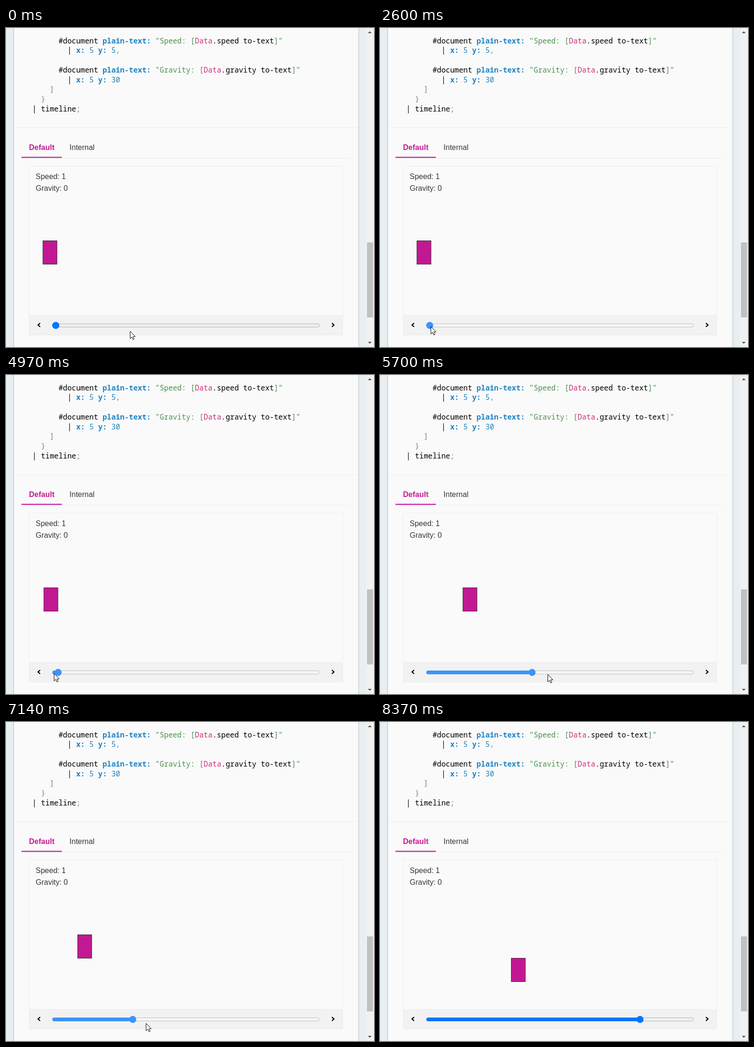
An HTML page that plays this animation: 784x680 px, repeating every 9.2 s.

```html
<!DOCTYPE html>
<html lang="en">
<head>
<meta charset="utf-8">
<title>Timeline scrubbing</title>
<style>
html, body { margin: 0; width: 100%; height: 100%; overflow: hidden; background: #e7eff2; }
svg { display: block; }
text { white-space: pre; font: 16px "Liberation Sans", Arial, sans-serif; fill: #363636; }
#code text { font: 15.625px "Noto Sans Mono", "DejaVu Sans Mono", monospace; fill: #000; }
#code .k { fill: #1f83c4; font-weight: 700; }
#code .n { fill: #1f83c4; }
#code .s { fill: #4b914f; }
#code .d { fill: #d32b79; }
#code .p { fill: #75868c; }
</style>
</head>
<body>
<svg width="784" height="680" viewBox="0 0 784 680">
  <rect x="15" y="-5" width="737.5" height="690" fill="#d3dadd"/>
  <rect x="16" y="-5" width="735" height="690" fill="#c9ced0"/>
  <rect x="17" y="-5" width="733.5" height="690" fill="#fafafa"/>

  <rect x="767" width="17" height="680" fill="#f1f1f1"/>
  <rect x="769" y="457" width="13" height="160" fill="#c1c1c1"/>
  <path d="M771 11l4-4 4 4zM771 669l4 4 4-4z" fill="#505050"/>

  <g id="code"></g>

  <path d="M17 212.5H750M33 277.5H733" stroke="#eeeef0"/>
  <text x="49" y="260" style="font-weight:700;fill:#c21b92">Default</text>
  <text x="135.3" y="260">Internal</text>
  <rect x="33" y="274.5" width="86" height="2.5" fill="#d030a4"/>

  <rect x="50" y="612" width="668" height="43" fill="#f2f2f2"/>
  <path d="M49.5 294.5H717.5V654.5H49.5ZM50 612.5H717" fill="none" stroke="#ededed"/>
  <text x="63.3" y="322">Speed: 1</text>
  <text x="63.3" y="347" id="gravity">Gravity: 0</text>
  <rect id="box" width="30" height="50" fill="#c21893" stroke="#3b2637"/>

  <path d="M72.7 629l-4.4 4 4.4 4M694.3 629l4.4 4-4.4 4" fill="none" stroke="#000" stroke-width="2.3"/>
  <rect id="rail" x="98.5" y="630.5" width="569" height="7" rx="3.5"/>
  <rect id="fill" x="99" y="630" height="8" rx="4"/>
  <circle id="thumb" cy="634" r="7.5"/>

  <path id="cursor" d="M.5 .5V16.2L4.2 12.8 6.6 18.3 9 17.2 6.7 11.8H11.4Z" fill="#fff" stroke="#000"/>
</svg>
<script>
const LOOP = 9200, PRESS = 2390, RELEASE = 7900, LAG = 30;
const MIN = 106, MAX = 661, TRAVEL = 249;
const $ = id => document.getElementById(id);
const clamp = (v, lo, hi) => Math.min(hi, Math.max(lo, v));

// Code listing: each line is an indent and its [class, text] runs
const label = (name, field) => [6, ["", "#document "], ["k", "plain-text: "], ["s", `"${name}: [`],
  ["d", "Data"], ["", `.${field} to-text`], ["s", ']"']];
const place = (y, end) => [8, ["", "| "], ["k", "x: "], ["n", "5 "], ["k", "y: "], ["n", y], ["p", end]];
const lines = [
  label("Speed", "speed"),
  place("5", ","),
  [0],
  label("Gravity", "gravity"),
  place("30", ""),
  [4, ["p", "]"]],
  [2, ["p", "}"]],
  [0, ["", "| timeline"], ["p", ";"]],
];
$("code").innerHTML = lines.map(([indent, ...runs], row) =>
  `<text x="${55.75 + indent * 9.375}" y="${Math.round(32.6 + row * 20.75)}">` +
  runs.map(([c, s]) => `<tspan class="${c}">${s}</tspan>`).join("") + "</text>").join("");

// Pointer strokes, resting in between
const home = { x: 264, y: 646 };
const strokes = [
  { from: 1870, to: 2400, x: 108, y: 636 },
  { from: 2600, to: 3970, x: 726, y: 636 },
  { from: 4130, to: 5040, x: 92, y: 636 },
  { from: 5040, to: 5110, x: 61, y: 636 },
  { from: 5270, to: 6170, x: 694, y: 640 },
  { from: 6440, to: 6940, x: 175, y: 644 },
  { from: 6940, to: 7300, x: 385, y: 640 },
  { from: 7370, to: 7830, x: 556, y: 638 },
  { from: 8130, to: 8420, x: 830, y: 363 },
];

function pointer(t) {
  let { x, y } = home;
  for (const s of strokes) {
    const u = clamp((t - s.from) / (s.to - s.from), 0, 1), ease = u * u * (3 - 2 * u);
    x += (s.x - x) * ease;
    y += (s.y - y) * ease;
  }
  return { x, y };
}

const looks = {
  idle: ["#0075ff", "#efefef", "#b2b2b2"],
  hover: ["#005cc8", "#e5e5e5", "#a0a0a0"],
  active: ["#3b94fb", "#f5f5f5", "#bfbfbf"],
};

function set(id, attrs) {
  for (const k in attrs) $(id).setAttribute(k, attrs[k]);
}

function draw(now) {
  const t = now % LOOP, { x, y } = pointer(t);
  // The thumb trails the pointer while pressed
  const heldAt = clamp(t - LAG, PRESS, RELEASE);
  const thumb = Math.round(clamp(pointer(heldAt).x - 2, MIN, MAX));
  const over = y > 626 && y < 642 && x > 98 && x < 668;
  const [blue, rail, edge] = looks[t >= PRESS && t < RELEASE ? "active" : over ? "hover" : "idle"];

  // One tick moves the box one pixel; it drops diagonally while gravity is on
  const tick = Math.round((thumb - MIN) / (MAX - MIN) * TRAVEL);
  const drop = clamp(tick - 112, 0, 50);
  set("box", { x: 78.7 + tick, y: 453.5 + drop });
  $("gravity").textContent = "Gravity: " + (drop > 0 && drop < 50 ? 1 : 0);

  set("rail", { fill: rail, stroke: edge });
  set("fill", { width: thumb - 99, fill: blue });
  set("thumb", { cx: thumb, fill: blue });
  set("cursor", { transform: `translate(${Math.round(x)} ${Math.round(y)})` });
}

const start = performance.now();
(function frame() {
  draw(performance.now() - start);
  requestAnimationFrame(frame);
})();
</script>
</body>
</html>
```
